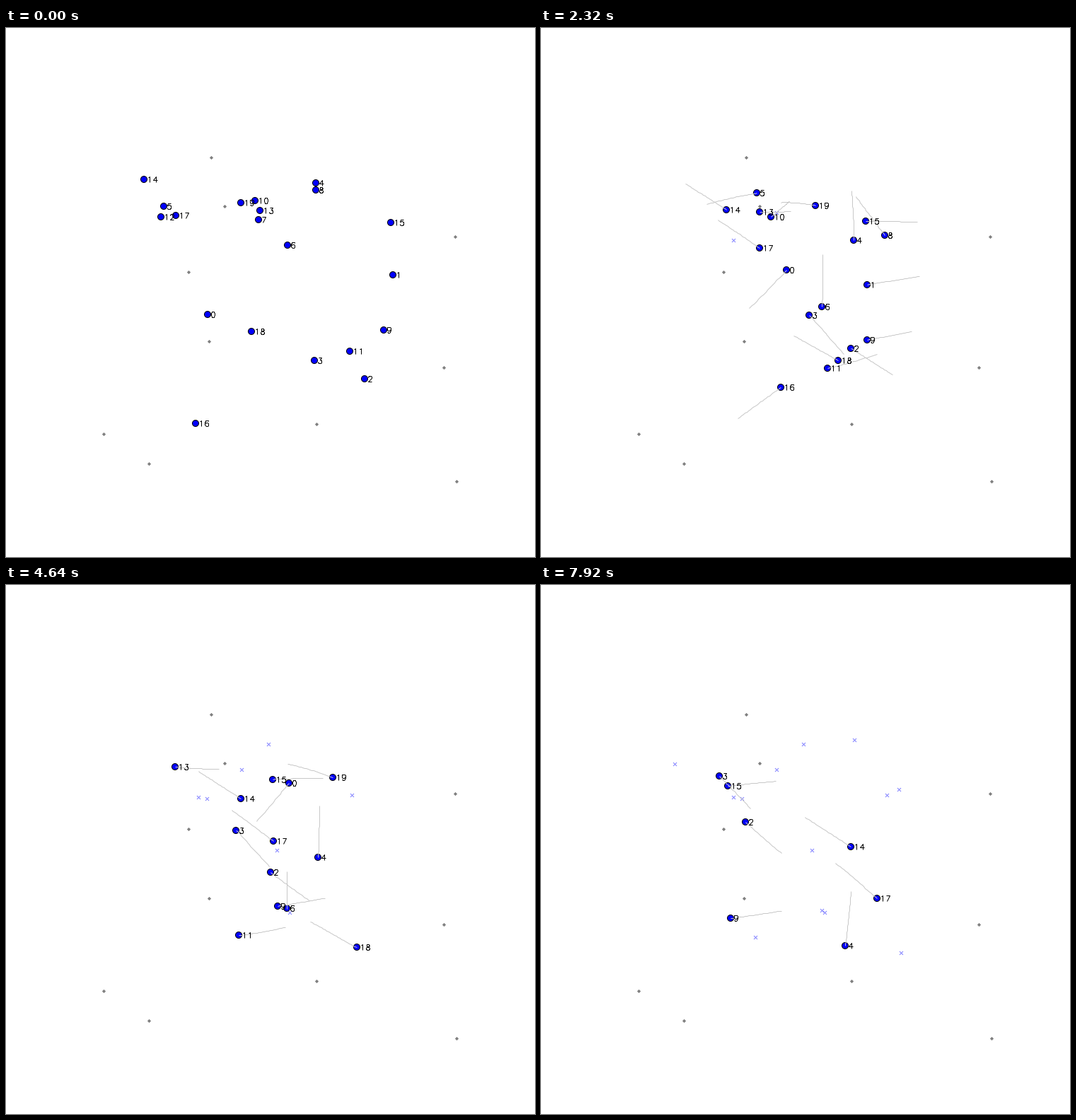
Write a matplotlib script that moves like this. It is 748 by 748 pixels and loops after 8 s.

```python
import numpy as np
import matplotlib.pyplot as plt
from matplotlib.animation import FuncAnimation
from matplotlib.collections import LineCollection
from matplotlib.patches import Circle, RegularPolygon

SIZE, DPI = 748, 64
PX = 72 / DPI
FRAMES, INTERVAL = 100, 80
LAST = FRAMES - 1
TRAIL = 25
RADIUS = 5

OBSTACLES = [(290, 183), (309, 252), (635, 295), (258, 345), (287, 443),
             (619, 480), (439, 560), (138, 574), (202, 616), (637, 641)]


class Agent:
    """Walks from start to goal; at half time it is `bend` pixels off the
    straight line sideways and `lead` pixels ahead of an even pace."""

    def __init__(self, start, goal, arrival=LAST, bend=0, lead=0):
        self.arrival = arrival
        start, goal = np.array(start, float), np.array(goal, float)
        along = (goal - start) / np.hypot(*(goal - start))
        across = np.array([-along[1], along[0]])
        s = np.clip(np.arange(FRAMES) / arrival, 0, 1)[:, None]
        sway = 4 * s * (1 - s)
        line = start + (goal - start) * s
        self.track = np.floor(line + sway * (bend * across + lead * along) + 0.5)

    def arrived(self, frame):
        return self.arrival < LAST and frame >= self.arrival

    def trail(self, frame):
        return self.track[max(0, frame - TRAIL):frame + 1] + 0.5


agents = [
    Agent((285, 405), (443, 219), 86, bend=7, lead=6),
    Agent((547, 349), (383, 375), 55),
    Agent((507, 496), (289, 335), bend=-7, lead=2),
    Agent((436, 470), (252, 270), bend=2, lead=7),
    Agent((438, 219), (430, 510), bend=-8, lead=-5),
    Agent((223, 252), (371, 225), 52, bend=-4),
    Agent((398, 307), (397, 460), 60, lead=13),
    Agent((357, 271), (333, 261), 10),
    Agent((438, 229), (489, 297), 31),
    Agent((534, 427), (268, 471), bend=-2, lead=-6),
    Agent((352, 244), (284, 302), 48, lead=-19),
    Agent((486, 457), (303, 498), 68, bend=-6, lead=4),
    Agent((219, 267), (272, 300), 23, bend=3),
    Agent((359, 258), (189, 253), 75, bend=-4, lead=-17),
    Agent((195, 214), (438, 370), lead=-6),
    Agent((544, 275), (264, 284), bend=6, lead=3),
    Agent((268, 559), (401, 463), 56, lead=3),
    Agent((240, 265), (475, 443), bend=-6, lead=-4),
    Agent((347, 429), (509, 520), 63, lead=-2),
    Agent((332, 247), (506, 289), 73, bend=-10, lead=-16),
]


def arc(cx, cy, rx, ry, start, stop):
    a = np.radians(np.linspace(start, stop, 17))
    return list(zip(cx + rx * np.cos(a), cy + ry * np.sin(a)))


# Single-stroke digits on a cell 20 units wide and 21 high.
six = arc(11, 10, 7, 11, 45, 180) + arc(10.5, 6.5, 6.5, 6.5, 180, 540)
DIGITS = {
    "0": arc(10, 10.5, 7, 10.5, 0, 360),
    "1": [(6, 17), (8, 18), (11, 21), (11, 0)],
    "2": arc(10, 15, 6, 6, 170, -40) + [(3, 0), (17, 0)],
    "3": [(5, 21), (16, 21), (10, 13)] + arc(10, 6.5, 7, 6.5, 75, -155),
    "4": [(13, 0), (13, 21), (3, 7), (18, 7)],
    "5": [(15, 21), (5, 21), (4, 12)] + arc(10, 7, 7, 7, 130, -155),
    "6": six,
    "7": [(3, 21), (17, 21), (7, 0)],
    "8": arc(10, 16, 5, 5, -90, 270) + arc(10, 5.5, 7, 5.5, 90, 450),
    "9": [(20 - x, 21 - y) for x, y in six],
}


def label_strokes(text):
    strokes = []
    for i, char in enumerate(text):
        u, v = np.array(DIGITS[char]).T
        strokes.append(np.column_stack([4.5 + 8 * i + np.floor(0.4 * u),
                                        4.5 - np.round(0.4 * v)]))
    return strokes


labels = [label_strokes(str(i)) for i in range(len(agents))]
CROSS = [np.array([(-2, -2), (3, 3)]), np.array([(-2, 3), (3, -2)])]

fig = plt.figure(figsize=(SIZE / DPI, SIZE / DPI), dpi=DPI, facecolor="white")
ax = fig.add_axes([0, 0, 1, 1])
ax.set_xlim(0, SIZE)
ax.set_ylim(SIZE, 0)
ax.axis("off")


def line_layer(color, zorder):
    layer = LineCollection([], colors=[color], linewidths=PX, zorder=zorder)
    return ax.add_collection(layer, autolim=False)


for x, y in OBSTACLES:
    ax.add_patch(RegularPolygon((x + 0.5, y + 0.5), 4, radius=2.6,
                                color="#808080", lw=0))

crosses = line_layer("#8080ff", 2)
trails = line_layer("#c8c8c8", 4)
texts = line_layer("black", 5)
disks = [ax.add_patch(Circle((0, 0), RADIUS - 0.5, fc="#0000ff", ec="black",
                             lw=PX, zorder=3)) for _ in agents]


def draw(frame):
    goal_lines, trail_lines, text_lines = [], [], []
    for agent, disk, strokes in zip(agents, disks, labels):
        pos = agent.track[frame]
        disk.set_visible(not agent.arrived(frame))
        if agent.arrived(frame):
            goal_lines += [pos + line for line in CROSS]
            continue
        disk.center = pos
        text_lines += [pos + stroke for stroke in strokes]
        if frame:
            trail_lines.append(agent.trail(frame))
    crosses.set_segments(goal_lines)
    trails.set_segments(trail_lines)
    texts.set_segments(text_lines)
    return [crosses, trails, texts, *disks]


anim = FuncAnimation(fig, draw, frames=FRAMES, interval=INTERVAL,
                     repeat=True, repeat_delay=0, blit=False)
plt.show()
```
